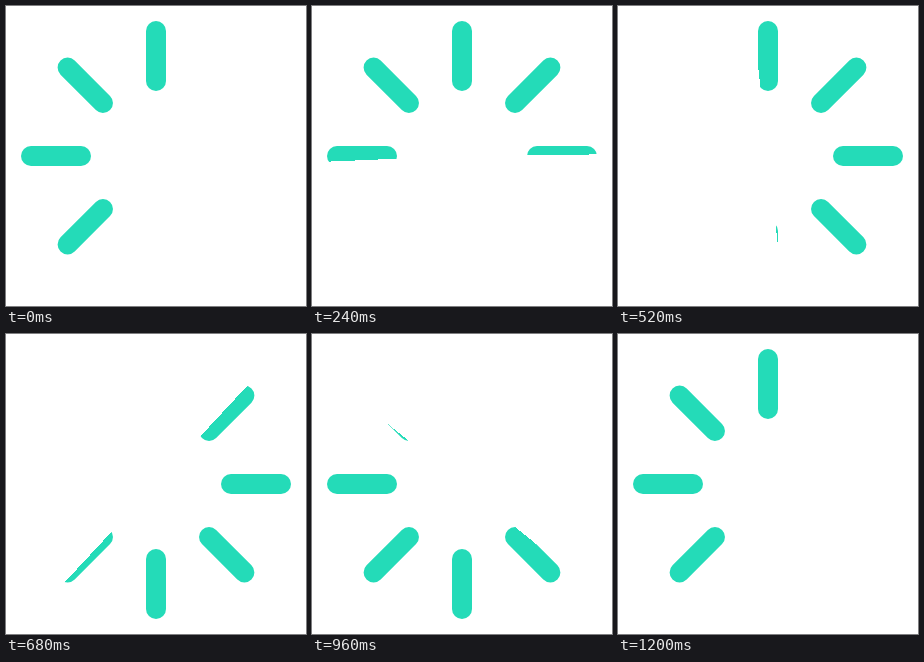
Recreate the animation shown at these times as an HTML page without scripts. Size 300 px wide and 300 px high, loop 1.24 s.

```html
<!DOCTYPE html>
<html lang="en">
<head>
<meta charset="utf-8">
<title>Spinner</title>
<style>
  /* --tail: trailing edge of the visible half; --extra: how far it exceeds 180deg */
  @property --tail { syntax: "<angle>"; inherits: false; initial-value: 193.8deg; }
  @property --extra { syntax: "<angle>"; inherits: false; initial-value: 0deg; }

  html, body {
    margin: 0;
    width: 100%;
    height: 100%;
    overflow: hidden;
    background: #fff;
  }

  .spinner {
    display: block;
    width: 300px;
    height: 300px;
    stroke: #24dbb8;
    stroke-width: 20;
    stroke-linecap: round;
    mask-image: conic-gradient(from var(--tail), #000 calc(180deg + var(--extra)), transparent 0);
    /* small offset keeps the steps clear of frame boundaries */
    animation: sweep 1240ms -4ms infinite;
  }

  /* 31 steps of 40ms, 12.3deg each */
  @keyframes sweep {
    0% {
      --tail: 193.8deg;
      --extra: 3.2deg;
      animation-timing-function: steps(13);
    }
    41.9355% {
      --tail: 353.7deg;
      --extra: 0deg;
      animation-timing-function: steps(18);
    }
    100% {
      --tail: 575.1deg;
      --extra: 0deg;
    }
  }
</style>
</head>
<body>
<svg class="spinner" viewBox="-150 -150 300 300">
  <defs>
    <path id="bar" d="M0-75V-125"/>
    <g id="cross">
      <use href="#bar"/>
      <use href="#bar" transform="rotate(90)"/>
      <use href="#bar" transform="rotate(180)"/>
      <use href="#bar" transform="rotate(270)"/>
    </g>
  </defs>
  <use href="#cross"/>
  <use href="#cross" transform="rotate(45)"/>
</svg>
</body>
</html>
```
